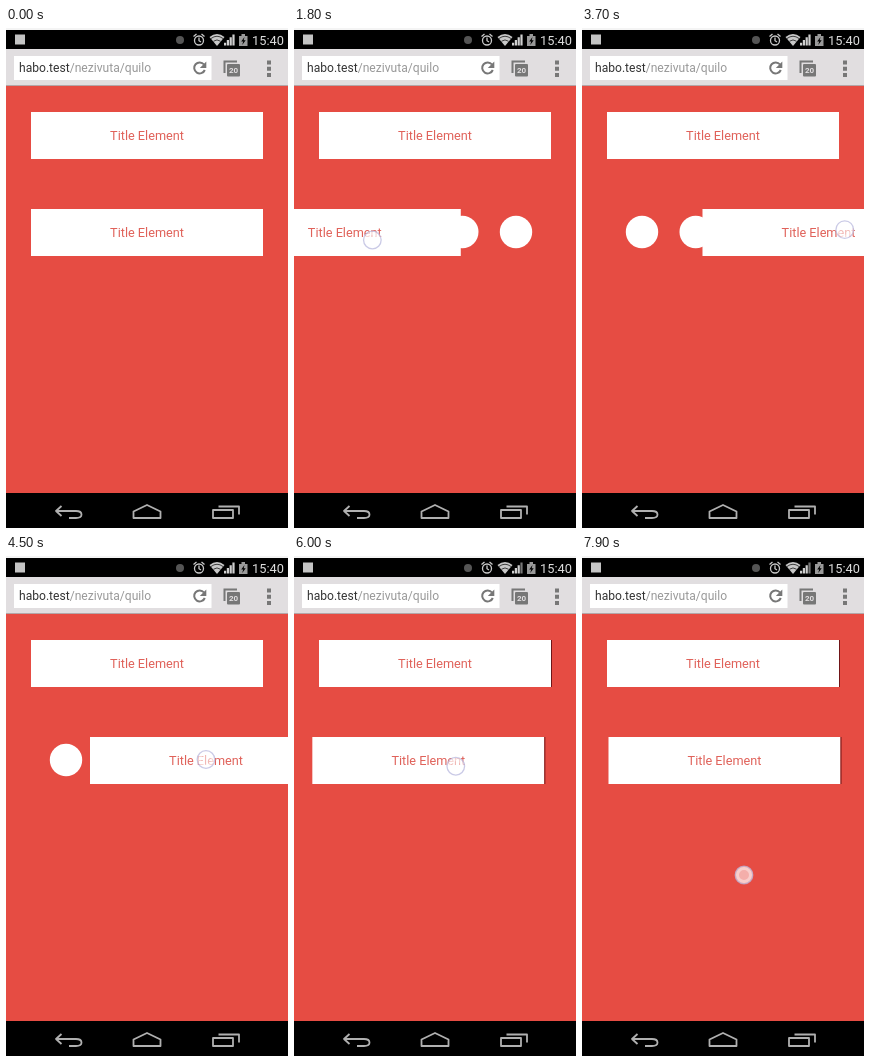
An HTML page for the animation above (8 s loop, 282 px wide and 500 px high).

```html
<!DOCTYPE html>
<html lang="en">
<head>
<meta charset="utf-8">
<title>Swipe card</title>
<style>
  html, body { margin: 0; width: 100%; height: 100%; overflow: hidden; background: #000; }
  svg { display: block; width: 100%; height: 100%; font-family: Roboto, "Open Sans", sans-serif; }
  .title { font-size: 12.7px; text-anchor: middle; fill: #e0625a; }
  .edge { fill: #701517; }
  .nav { fill: none; stroke: #b0b0b0; stroke-width: 1.8; stroke-linejoin: round; }
</style>
</head>
<body>
<svg viewBox="0 0 282 500">
  <defs>
    <g id="card">
      <rect width="232" height="47" fill="#fff"/>
      <text class="title" x="116" y="27.6">Title Element</text>
    </g>
  </defs>

  <!-- page -->
  <rect y="58" width="282" height="407" fill="#e64c43"/>
  <use href="#card" x="25" y="84"/>
  <rect class="edge" x="257" y="84" width="1" height="47"/>
  <g id="dots" fill="#fff"></g>
  <g id="slider">
    <use href="#card"/>
    <rect class="edge" x="232" width="1" height="47"/>
  </g>

  <!-- status bar -->
  <rect width="282" height="22" fill="#000"/>
  <rect width="282" height="2" fill="#f4f4f4"/>
  <rect x="9" y="6.5" width="10" height="10" fill="#c4c4c4"/>
  <circle cx="174" cy="12" r="4" fill="#555"/>
  <g fill="none" stroke="#c8c8c8" stroke-width="1.3">
    <circle cx="193" cy="12.5" r="4.5"/>
    <path d="M193 9.5v3.2l2 1.3M187.5 8.5l3-2.5M198.5 8.5l-3-2.5"/>
  </g>
  <path d="M203.5 9q7.500-6 15 0L211 18z" fill="#c8c8c8"/>
  <path d="M205 10.5q6-4.5 12 0M207.5 13.2q3.5-2.5 7 0" fill="none" stroke="#000" stroke-width=".7"/>
  <g id="signal"></g>
  <path d="M233 8h2.5V6h3.5v2h2.5v10H233z" fill="#999"/>
  <path d="M238.5 9l-3.3 4.5h2l-1 3.5 3.5-4.7h-2z" fill="#000"/>
  <text x="246" y="17" font-size="12.8" fill="#dcdcdc">15:40</text>

  <!-- browser bar -->
  <rect y="21" width="282" height="37" fill="#e1dee0"/>
  <rect y="57" width="282" height="1" fill="#b3a6a8"/>
  <rect x="8" y="28" width="197.5" height="24" fill="#fff"/>
  <text x="13" y="44.2" font-size="12.1" fill="#333">habo.test<tspan fill="#999">/nezivuta/quilo</tspan></text>
  <path d="M198 36.5A5.5 5.5 0 1 0 198.8 42" fill="none" stroke="#777" stroke-width="2"/>
  <path d="M200.3 33.5v6.5h-6.5z" fill="#777"/>
  <path d="M218.5 45V33.5H231" fill="none" stroke="#777" stroke-width="2"/>
  <rect x="221" y="36" width="13" height="12.5" rx="1" fill="#777"/>
  <text x="227.5" y="45.2" font-size="8" font-weight="700" text-anchor="middle" fill="#e1dee0">20</text>
  <path d="M263 32.5v16.400" stroke="#777" stroke-width="4" stroke-dasharray="4 2.2"/>

  <!-- navigation bar -->
  <rect y="465" width="282" height="35" fill="#000"/>
  <g class="nav">
    <path d="M55.5 478L50 483l5.5 5M50 483H70q5.500 0 5.500 3.500t-5.500 3.500H63"/>
    <path d="M127.5 490v-6.5L141 477l13.5 6.500v6.500z"/>
    <path d="M207 482h20v8h-20zM212.500 478.500h20.500v8"/>
  </g>

  <g id="touch">
    <circle r="9" fill="#fff" fill-opacity=".55"/>
    <circle r="6.5" fill="none" stroke="#fff" stroke-opacity=".4" stroke-width="3"/>
    <circle r="8.8" fill="none" stroke="#b4b4dc" stroke-opacity=".7" stroke-width="1.3"/>
  </g>
</svg>
<script>
const LOOP = 8000, TICK = 100;
const TOUCH_DOWN = 500, SIGNAL_DROP = 5600, EDGE_SHOWN = 5800;
const STAGE_WIDTH = 282, DOT_INSET = 60, DOT_GAP = 53.7, BARS = 4;

// Key points: time, value
const cardShift = [[500, 0], [1950, -93], [2900, 25], [3800, 97], [3900, 97],
  [4500, 59], [5400, -30], [6400, 6], [6700, 6], [7600, 1.5]];
const fingerX = [[500, 168], [1850, 78], [2900, 203], [3800, 264], [4500, 200],
  [5300, 138], [6400, 172], [7800, 168], [7900, 162]];
const fingerY = [[1800, 212], [2900, 201], [7000, 217], [7700, 319]];

const byId = id => document.getElementById(id);
const slider = byId("slider"), touch = byId("touch");
const edges = document.querySelectorAll(".edge");
const show = (el, on) => el.setAttribute("visibility", on ? "visible" : "hidden");
const place = (el, x, y) => el.setAttribute("transform", `translate(${x.toFixed(2)} ${y.toFixed(2)})`);

function add(parent, tag, attributes) {
  const el = document.createElementNS("http://www.w3.org/2000/svg", tag);
  for (const name in attributes) el.setAttribute(name, attributes[name]);
  return parent.appendChild(el);
}

// Two dots wait behind the card on each side, mirrored about the middle.
for (let i = 0; i < 2; i++) {
  const x = DOT_INSET + i * DOT_GAP;
  for (const cx of [x, STAGE_WIDTH - x]) add(byId("dots"), "circle", { cx, cy: 204, r: 16.2 });
}

const bars = Array.from({ length: BARS }, (_, i) => {
  const height = 2.75 * (i + 1);
  return add(byId("signal"), "rect", { x: 218 + 2.8 * i, y: 17.5 - height, width: 2.2, height });
});

function slope(track, i) {
  const a = track[i], b = track[i + 1];
  return a && b ? (b[1] - a[1]) / (b[0] - a[0]) : 0;
}

// Level at turning points, so holds and extremes never overshoot.
function tangent(track, i) {
  const before = slope(track, i - 1), after = slope(track, i);
  return before * after > 0 ? 2 * before * after / (before + after) : 0;
}

function valueAt(track, t) {
  const next = track.findIndex(key => key[0] > t);
  if (next === 0) return track[0][1];
  if (next < 0) return track[track.length - 1][1];
  const i = next - 1, [t0, from] = track[i], [t1, to] = track[next];
  const span = t1 - t0, u = (t - t0) / span, v = 1 - u;
  return v * v * (1 + 2 * u) * from + u * u * (1 + 2 * v) * to
    + span * u * v * (v * tangent(track, i) - u * tangent(track, next));
}

function draw(t) {
  place(slider, 25 + valueAt(cardShift, t), 181);
  place(touch, valueAt(fingerX, t), valueAt(fingerY, t));
  show(touch, t >= TOUCH_DOWN);
  edges.forEach(edge => show(edge, t >= EDGE_SHOWN));
  const lit = t < SIGNAL_DROP ? BARS : BARS - 1;
  bars.forEach((bar, i) => bar.setAttribute("fill", i < lit ? "#d0d0d0" : "#777"));
}

const start = performance.now();
function frame() {
  const t = (performance.now() - start) % LOOP;
  draw(Math.floor(t / TICK) * TICK);
  requestAnimationFrame(frame);
}
frame();
</script>
</body>
</html>
```
